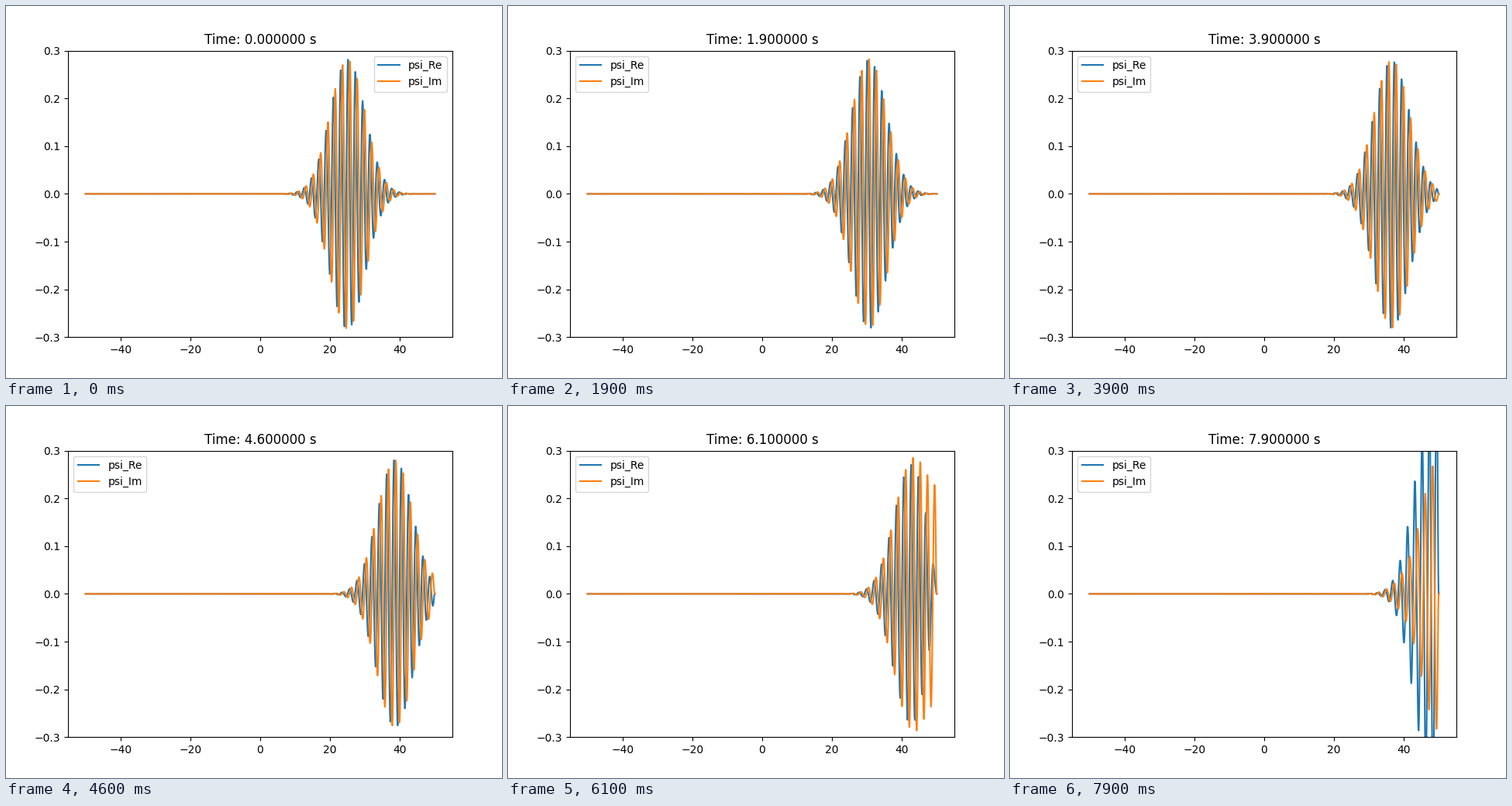
These frames come from a looping animation (640 by 480 pixels, 8000 ms). A matplotlib script:

```python
import numpy as np
import matplotlib.pyplot as plt
from matplotlib.animation import FuncAnimation

FRAMES, INTERVAL = 80, 100
DT = INTERVAL / 1000

# Gaussian wave packet on a grid, hbar = m = 1
X0, WIDTH, K = 25.0, 5.0, 3.0
WALL = 49.84
x = np.linspace(-50, 50, 1001)
dx = 0.1

# Lattice dispersion: E(k) = (1 - cos(k dx)) / dx^2
OMEGA = (1 - np.cos(K * dx)) / dx**2
SPEED = np.sin(K * dx) / dx
SPREAD = np.cos(K * dx) / WIDTH**2
AMP = 1 / np.sqrt(WIDTH * np.sqrt(2 * np.pi))


def packet(pos, t):
    """Free packet, moving and spreading."""
    q = 1 + 1j * SPREAD * t
    d = pos - X0 - SPEED * t
    envelope = AMP / np.sqrt(q) * np.exp(-d**2 / (2 * WIDTH**2 * q))
    return envelope * np.exp(1j * (K * pos - OMEGA * t))


def psi(t):
    """Packet reflected by a hard wall, using its mirror image."""
    wave = packet(x, t) - packet(2 * WALL - x, t)
    return np.where(np.abs(x) < WALL, wave, 0)


fig, ax = plt.subplots(figsize=(6.4, 4.8), dpi=100)
start = psi(0)
line_re, = ax.plot(x, start.real, label="psi_Re")
line_im, = ax.plot(x, start.imag, label="psi_Im")
ax.set_ylim(-0.3, 0.3)
ax.legend(loc="best")
title = ax.set_title("Time: 0.000000 s")


def update(i):
    t = i * DT
    wave = psi(t)
    line_re.set_ydata(wave.real)
    line_im.set_ydata(wave.imag)
    title.set_text(f"Time: {t:f} s")
    return line_re, line_im, title


anim = FuncAnimation(fig, update, frames=FRAMES, interval=INTERVAL,
                     repeat=True, repeat_delay=0, blit=False)
plt.show()
```
